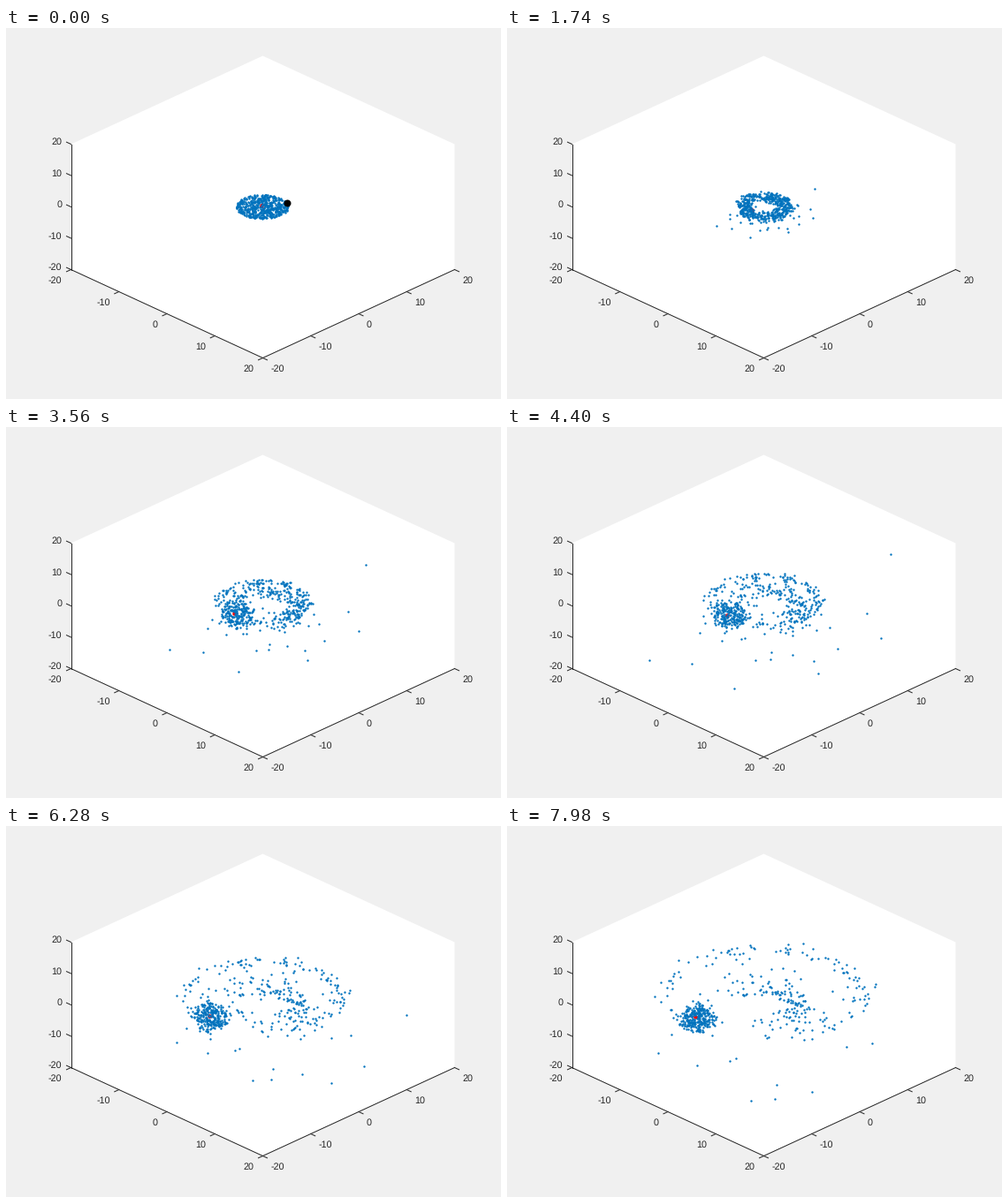
Write a matplotlib script that moves like this. It is 560 px wide and 420 px high and loops after 8000 ms.

```python
import numpy as np
import matplotlib.pyplot as plt
from matplotlib.animation import FuncAnimation

W, H, DPI = 560, 420, 100
FRAMES, STEP = 400, 20
PX = 72 / DPI                    # points per pixel
CX, CY, TILT = 290, 202, 0.46    # disc centre and foreshortening
RADIUS, SPEED = 29.5, 16         # disc size (px), orbital speed (px/s)
T0 = 0.75                        # moment the disc breaks up
N, FLUNG = 540, 22               # disc stars, stars thrown far out
INK, BLUE = "#262626", "#0072BD"

plt.rcParams["text.hinting"] = "none"
rng = np.random.default_rng(12)

fig = plt.figure(figsize=(W / DPI, H / DPI), dpi=DPI, facecolor="#f0f0f0")
ax = fig.add_axes([0, 0, 1, 1])
ax.set_xlim(0, W)
ax.set_ylim(H, 0)
ax.axis("off")


def project(a, b, z):
    return 290.5 + 5.425 * (a + b), 202.5 + 2.5 * (a - b) - 3.55 * z


def segment(p, q):
    ax.plot([p[0], q[0]], [p[1], q[1]], color=INK, lw=PX, zorder=2)


def tick(p, dx, dy, value, tx, ty, align):
    segment(p, (p[0] + dx, p[1] + dy))
    ax.text(p[0] + tx, p[1] + ty, str(value), ha=align, va="baseline",
            color=INK, family="Liberation Sans", fontsize=10.8 * PX)


def draw_box():
    top, right = project(-20, 20, 20), project(20, 20, -20)
    left, front = project(-20, -20, -20), project(20, -20, -20)
    upper_left, upper_right = project(-20, -20, 20), project(20, 20, 20)
    outline = [top, upper_right, right, front, left, upper_left]
    ax.fill(*zip(*outline), color="white", lw=0, zorder=1)
    segment(upper_left, left)
    segment(left, front)
    segment(front, right)
    for v in range(-20, 21, 10):
        tick(project(-20, -20, v), -5, -2.3, v, -10, 0.6, "right")
        tick(project(v, -20, -20), -5, 2.3, v, -10, 15, "right")
        tick(project(20, v, -20), 5, 2.3, v, 9, 15, "left")


def disc_stars():
    """Radius, phase, screen velocity and fall-back rate of the disc."""
    r = RADIUS * np.sqrt(rng.random(N))
    phase = rng.uniform(0, 2 * np.pi, N)
    inner = rng.random(N) < 0.62
    fall = np.where(inner, rng.uniform(0.004, 0.08, N), rng.uniform(0, 0.002, N))
    spread = np.where(inner, 2.5, 0.8)
    vx = -SPEED * np.sin(phase) + spread * rng.normal(0, 1, N)
    vy = -SPEED * TILT * np.cos(phase) + spread * rng.normal(0, 0.7, N)
    return r, phase, vx, vy + np.where(inner, 1, -1.6), fall


def flung_stars():
    """A fan thrown off the near rim of the disc."""
    fan = np.radians(np.linspace(-15, 160, FLUNG) + rng.normal(0, 4, FLUNG))
    speed = 7 + 24 * rng.random(FLUNG) ** 2
    r = np.full(FLUNG, RADIUS)
    return r, -fan, 1.2 * speed * np.cos(fan), speed * np.sin(fan), 0 * r


R, PHASE, VX, VY, FALL = map(np.concatenate, zip(disc_stars(), flung_stars()))


def core(t):
    tau = max(t - 0.6, 0)
    return (289 - 10.8 * tau + 0.07 * tau ** 2,
            200.5 + 17 * (1 - np.exp(-tau / 3)))


def free_path(t):
    """Circular orbits first, then flight that slows and falls back."""
    before, after = min(t - T0, 0), max(t - T0, 0)
    ang = PHASE + SPEED / np.maximum(R, 8) * before
    run = after / (1 + FALL * after ** 2)
    return (CX + R * np.cos(ang) + VX * run,
            CY - TILT * R * np.sin(ang) + VY * run)


def catch_times():
    """Stars passing close to the core are caught, the nearest ones first."""
    x, y = free_path(2.75)
    cx, cy = core(2.75)
    dist = np.hypot(x - cx, (y - cy) / 0.5)[:N] + rng.normal(0, 17, N)
    rank = np.argsort(np.argsort(dist)) / (0.53 * N)
    start = np.where(rank < 1, 0.9 + 5 * rank ** 4, np.inf)
    return np.r_[start, np.full(FLUNG, np.inf)]


CATCH = catch_times()
ORBIT = 16 * rng.random(N + FLUNG) ** 0.8 + rng.exponential(3.5, N + FLUNG)
SPIN = 30 / (ORBIT + 8)
ANGLE = rng.uniform(0, 2 * np.pi, N + FLUNG)
FLAT = rng.uniform(0.6, 1, N + FLUNG)


def stars(t):
    x, y = free_path(t)
    cx, cy = core(t)
    u = np.clip((t - CATCH) / 2.6, 0, 1)
    w = u * u * (3 - 2 * u)
    ang = ANGLE + SPIN * t
    x = x + w * (cx + 2 + ORBIT * np.cos(ang) - x)
    y = y + w * (cy + 1 - ORBIT * FLAT * np.sin(ang) - y)
    x[np.hypot((x - CX) / 180, (y - CY) / 115) > 1] = np.nan  # left the box
    return x, y


def dots(color, size, z):
    return ax.plot([], [], "o", color=color, ms=size * PX, mew=0, zorder=z)[0]


draw_box()
back = dots(BLUE, 2.4, 3)
heart = dots("red", 4.5, 4)
front = dots(BLUE, 2.4, 5)
intruder = dots("black", 8, 6)


def update(i):
    t = i * STEP / 1000
    x, y = stars(t)
    back.set_data(x[::2], y[::2])
    front.set_data(x[1::2], y[1::2])
    cx, cy = core(t)
    heart.set_data([cx], [cy])
    intruder.set_data([317.5 - 134 * t], [197.5 + 20 * t])
    intruder.set_visible(t < 1)
    return back, heart, front, intruder


anim = FuncAnimation(fig, update, frames=FRAMES, interval=STEP,
                     repeat=True, repeat_delay=0, blit=False)
plt.show()
```
